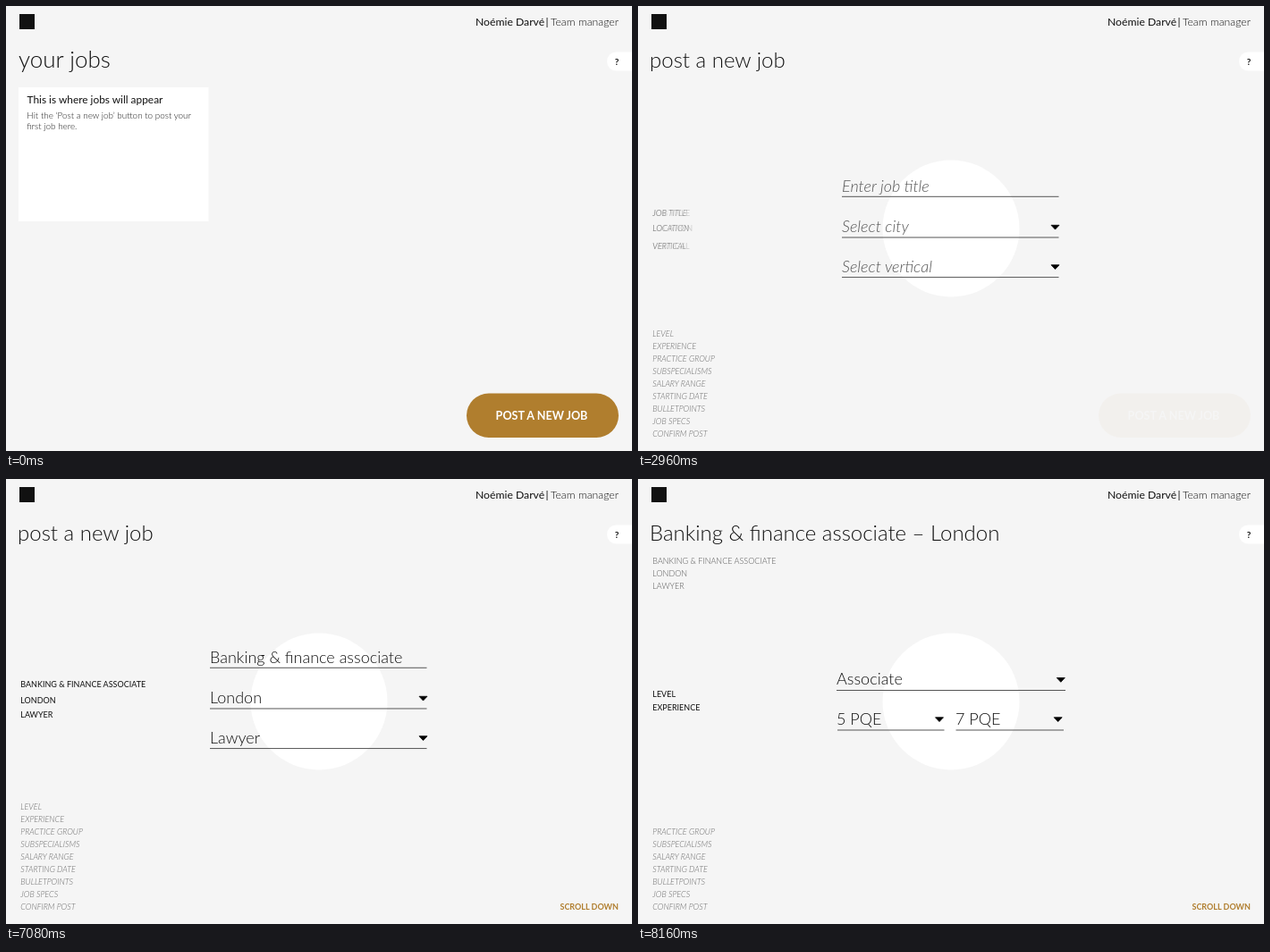
Write an HTML page that moves like this. It is 700 by 498 pixels and loops after 9000 ms.

```html
<!DOCTYPE html>
<html lang="en">
<head>
<meta charset="utf-8">
<title>Post a new job</title>
<style>
  html, body { margin: 0; width: 100%; height: 100%; overflow: hidden; background: #f5f5f5; }
  svg { display: block; width: 700px; height: 498px; }
  text { font-family: Lato, sans-serif; font-size: 9px; fill: #111; white-space: pre; }
  .light { font-weight: 300; }
  .bold { font-weight: 700; }
  .heading { font-size: 24px; font-weight: 300; }
  .header { font-size: 12.2px; }
  .hint { font-size: 9.9px; font-weight: 300; fill: #222; }
  .value { font-size: 18px; font-weight: 300; }
  .prompt { font-size: 18px; font-weight: 300; font-style: italic; fill: #555; }
  .todo { font-weight: 300; font-style: italic; fill: #666; }
  .done { font-weight: 300; fill: #555; }
  .rule { stroke: #555; stroke-width: 1; }
</style>
</head>
<body>
<svg id="stage" viewBox="0 0 700 498"></svg>
<script>
const LOOP = 9000, STEP = 40;
const MOVE = 630, STAGGER = 52, SCROLL = 370;
const JOB = 'Banking & finance associate';
const TOPICS = ['JOB TITLE', 'LOCATION', 'VERTICAL', 'LEVEL', 'EXPERIENCE', 'PRACTICE GROUP',
  'SUBSPECIALISMS', 'SALARY RANGE', 'STARTING DATE', 'BULLETPOINTS', 'JOB SPECS', 'CONFIRM POST'];
const ANSWERS = [JOB.toUpperCase(), 'LONDON', 'LAWYER'];
const FORM_Y = [231.5, 247.5, 263.5];
const DONE_Y = [91.5, 105.5, 120];
const LEVEL_Y = [240.5, 255.5];

const escapeText = s => s.replace(/&/g, '&amp;');
const text = (x, y, cls, content, attrs = '') =>
  `<text x="${x}" y="${y}" class="${cls}" ${attrs}>${escapeText(content)}</text>`;
const rule = (x1, x2, y) => `<path class="rule" d="M${x1} ${y}H${x2}"/>`;
const arrow = (x, y) =>
  `<path d="M${x - 4.5} ${y}h9l-4.5 4.8z" stroke="#000" stroke-width=".8" stroke-linejoin="round"/>`;
const group = (id, content) => `<g id="${id}">${content}</g>`;

const label = (topic, i) => group('label' + i,
  text(16.3, 3.3, 'todo', topic) +
  (i < 5 ? text(16.3, 3.3, 'active', topic) : '') +
  (i < 3 ? text(16.3, 3.3, 'answer', ANSWERS[i]) + text(16.3, 3.3, 'done', ANSWERS[i]) : ''));

document.getElementById('stage').innerHTML =
  '<rect width="700" height="498" fill="#f5f5f5"/>' +
  '<circle id="disc" cx="350" cy="249" fill="#fff"/>' +
  '<rect x="15" y="9" width="17" height="17" fill="#111"/>' +
  text(525, 22.3, 'header', 'Noémie Darvé') +
  text(603.5, 22.3, 'header', '|') +
  text(685, 22.3, 'header light', 'Team manager', 'text-anchor="end"') +
  '<rect x="672" y="51.5" width="50" height="21" rx="10.5" fill="#fff"/>' +
  text(683, 65.5, 'bold', '?', 'text-anchor="middle" style="font-size:10px"') +
  group('jobs',
    text(14, 69, 'heading', 'your jobs', 'style="font-size:26px"') +
    '<rect x="14" y="91" width="212.5" height="150" fill="#fff"/>' +
    text(23.5, 109, '', 'This is where jobs will appear', 'style="font-size:11.9px"') +
    text(23.3, 126, 'hint', 'Hit the ‘Post a new job’ button to post your') +
    text(23.3, 137.7, 'hint', 'first job here.')) +
  text(13, 69, 'heading', 'post a new job', 'id="postTitle"') +
  text(13, 69, 'heading', JOB + ' – London', 'id="jobTitle"') +
  group('form',
    rule(228, 470.5, 213.3) + rule(228, 470.5, 259) + rule(228, 470.5, 303.6) +
    arrow(466.5, 245.3) + arrow(466.5, 289.8) +
    text(228, 208, 'prompt', 'Enter job title', 'id="titlePrompt"') +
    text(228, 208, 'value', '', 'id="typed"') +
    group('prompts', text(228, 253, 'prompt', 'Select city') + text(228, 298, 'prompt', 'Select vertical')) +
    group('choices', text(228, 253, 'value', 'London') + text(228, 298, 'value', 'Lawyer'))) +
  group('levelForm',
    rule(222, 478, 236.5) + rule(223, 342.5, 281) + rule(355.5, 476, 281) +
    arrow(472.8, 222.5) + arrow(337, 266.8) + arrow(469.7, 266.8) +
    text(222, 229.8, 'value', 'Associate') +
    text(222, 275, 'value', '5 PQE') + text(355, 275, 'value', '7 PQE')) +
  TOPICS.map(label).join('') +
  group('button',
    '<rect x="515" y="433.5" width="170" height="49.5" rx="24.75" fill="#b07e2e"/>' +
    text(599, 462.5, 'bold', 'POST A NEW JOB', 'text-anchor="middle" style="font-size:12.6px;fill:#fff"')) +
  text(685, 481.8, 'bold', 'SCROLL DOWN', 'id="scrollHint" text-anchor="end" style="fill:#b07e2e"');

const el = id => document.getElementById(id);
const ramp = (t, from, to) => Math.min(1, Math.max(0, (t - from) / (to - from)));
const ease = u => u < .5 ? 4 * u ** 3 : 1 - 4 * (1 - u) ** 3;
const glide = (t, start, duration = MOVE) => ease(ramp(t, start, start + duration));
const mix = (a, b, k) => a + (b - a) * k;
const fade = (node, alpha) => node.setAttribute('opacity', alpha);
const shift = (node, y) => node.setAttribute('transform', `translate(0 ${y})`);

function drawLabel(i, t, answered, finished) {
  const node = el('label' + i);
  const [todo, active, answer, done] = node.children;
  let y = 478.5 - 14 * (11 - i) + 220 * (1 - glide(t, 1640));
  if (i < 3) {
    y = mix(y, FORM_Y[i], glide(t, 2380 + i * STAGGER));
    y = mix(y, DONE_Y[i], glide(t, 6980 + i * STAGGER));
    const lit = ramp(t, 2920, 3160);
    fade(todo, 1 - lit);
    fade(active, lit * (1 - answered));
    fade(answer, answered * (1 - finished));
    fade(done, finished);
  } else if (i < 5) {
    y = mix(y, LEVEL_Y[i - 3], glide(t, 6980 + (i + 1) * STAGGER));
    fade(todo, 1 - finished);
    fade(active, finished);
  }
  shift(node, y);
}

function draw(t) {
  const answered = ramp(t, 5240, 5800);
  const finished = ramp(t, 7880, 8160);
  const scrolled = SCROLL * glide(t, 6980, 900);
  const grown = ramp(t, 2080, 2320);

  fade(el('jobs'), 1 - ramp(t, 1860, 2100));
  fade(el('button'), Math.exp(-2 * ramp(t, 1440, 2320)) * (1 - ramp(t, 2380, 3160)));
  el('disc').setAttribute('r', mix(58.5, 76.5, grown));
  fade(el('disc'), grown);

  shift(el('postTitle'), 460 * (1 - glide(t, 1603)));
  fade(el('postTitle'), 1 - finished);
  fade(el('jobTitle'), finished);

  fade(el('form'), ramp(t, 2220, 2320));
  shift(el('form'), -scrolled);
  shift(el('levelForm'), SCROLL - scrolled);
  fade(el('titlePrompt'), t < 4360 ? 1 : 0);
  el('typed').textContent = JOB.slice(0, Math.max(0, Math.floor((t - 4360) / 34)));
  fade(el('prompts'), 1 - answered);
  fade(el('choices'), answered);
  fade(el('scrollHint'), answered);

  TOPICS.forEach((_, i) => drawLabel(i, t, answered, finished));
}

const begin = performance.now();
function tick() {
  const t = (performance.now() - begin) % LOOP;
  draw(Math.floor(t / STEP) * STEP);
  requestAnimationFrame(tick);
}
tick();
</script>
</body>
</html>
```
